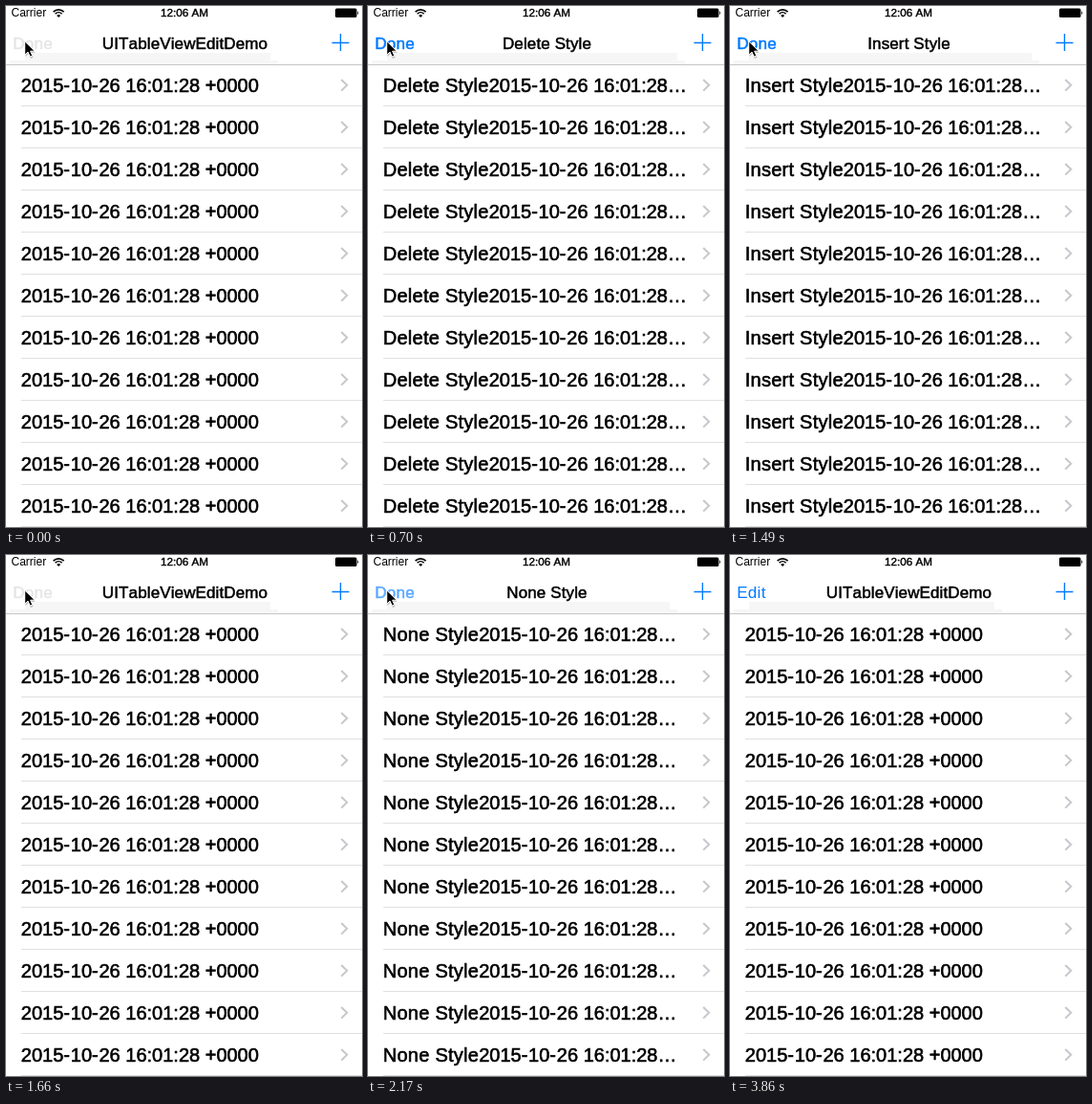
Write an HTML page that moves like this. It is 373 by 545 pixels and loops after 4.28 s.

```html
<!DOCTYPE html>
<html lang="en">
<head>
<meta charset="utf-8">
<title>Table view edit demo</title>
<style>
  html, body { margin: 0; width: 100%; height: 100%; overflow: hidden; background: #fff; }
  svg { display: block; width: 373px; height: 545px; }
  text { font-family: "Liberation Sans", Arial, Helvetica, sans-serif; fill: #000; font-kerning: none; }
  .medium { stroke: #000; stroke-width: .6px; }
  .row { font-size: 20px; }
  .prefix { letter-spacing: .25px; }
  .dash { letter-spacing: .8px; }
  .title { font-size: 17px; letter-spacing: .12px; text-anchor: middle; stroke-width: .5px; }
  .clock { font-size: 11.7px; text-anchor: middle; stroke-width: .4px; }
  #button { font-size: 17px; letter-spacing: .3px; stroke-width: .5px; }
  .rule { stroke: #e0e0e1; }
  .chevron { fill: none; stroke: #c7c7cc; stroke-width: 2; }
  .shade { fill: #f6f6f6; }
</style>
</head>
<body>
<svg viewBox="0 0 373 545">
  <rect width="373" height="545" fill="#fff"/>
  <text x="5.5" y="11" font-size="12">Carrier</text>
  <g fill="none" stroke="#000" stroke-width="1.6">
    <path d="M49.6 6.1a7.8 7.8 0 0 1 11 0M51.6 8.2a5 5 0 0 1 7 0"/>
    <path d="M55.1 12l-2-2.1a2.9 2.9 0 0 1 4 0z" fill="#000" stroke="none"/>
  </g>
  <text class="clock medium" x="187" y="11">12:06 AM</text>
  <rect x="345" y="2.5" width="22.5" height="9.5" rx="1.5"/>
  <path d="M368.4 5.2q2 2 0 4z"/>

  <rect id="shadeTop" class="shade" x="20" y="49" height="8"/>
  <rect id="shadeLow" class="shade" x="4" y="57" height="4"/>
  <path d="M0 61.5H373" stroke="#c6c6c8"/>
  <text id="title" class="title medium" x="187.5" y="45"></text>
  <text id="button" x="7.2" y="45"></text>
  <path d="M350.5 29v18M341.5 38.5h18" stroke="#007aff" stroke-width="1.4"/>
  <g id="rows"></g>
  <g id="cursor">
    <path d="M1 2v14.2l3.3-3.1 2.2 5 2.6-1.1-2.2-4.8h4.5z" opacity=".22" transform="translate(.4 .9)"/>
    <path d="M.7.9v14.3l3.3-3.1 2.2 5 2.5-1.1-2.1-4.8h4.5z" stroke="#fff" stroke-width="1"/>
  </g>
</svg>
<script>
const LOOP = 4280;
const BLUE = "#007aff", DIM = "#000";
const $ = id => document.getElementById(id);

// edge: right end of the bar tint, which follows the row text
const modes = {
  demo:   { title: "UITableViewEditDemo", prefix: "", tail: " +0000", edge: 277 },
  del:    { title: "Delete Style", prefix: "Delete Style", tail: "…", edge: 324 },
  insert: { title: "Insert Style", prefix: "Insert Style", tail: "…", edge: 316 },
  none:   { title: "None Style", prefix: "None Style", tail: "…", edge: 316 }
};

const modeTimes = [
  [0, "demo"], [440, "del"], [1050, "demo"], [1320, "insert"],
  [1660, "demo"], [1830, "none"], [2350, "demo"]
];

// time, label, colour, opacity
const buttonTimes = [
  [0, "Done", DIM, .1], [90, "Edit", BLUE, .24], [180, "Edit", BLUE, .6],
  [260, "Edit", BLUE, 1], [350, "Edit", DIM, .06],
  [530, "Done", BLUE, .25], [620, "Done", BLUE, .65], [700, "Done", BLUE, 1],
  [790, "Done", BLUE, .6], [880, "Done", BLUE, .2], [970, "Done", DIM, .1],
  [1140, "Edit", BLUE, .24], [1230, "Edit", DIM, .06],
  [1400, "Done", BLUE, .5], [1490, "Done", BLUE, 1], [1570, "Done", DIM, .1],
  [1740, "Edit", DIM, .06],
  [2000, "Done", BLUE, .25], [2090, "Done", BLUE, .65], [2180, "Done", BLUE, 1],
  [2260, "Done", DIM, .1], [2440, "Edit", BLUE, .24], [2530, "Edit", BLUE, .6],
  [2620, "Edit", BLUE, 1]
];

// time, x, y
const cursorTimes = [
  [0, 19, 36], [2620, 80, 140], [2710, 200, 345], [2800, 275, 452],
  [2980, 205, 250], [3070, 114, 39], [3330, 230, 330], [3420, 319, 542],
  [3690, 345, 533], [3780, 345, 538], [3860, 345, 580]
];

const at = (list, t) => list.findLast(item => item[0] <= t);

const date = "2015-10-26 16:01:28".replaceAll("-", '<tspan class="dash">-</tspan>');
$("rows").innerHTML = Array.from({ length: 11 }, (_, i) => {
  const y = 61 + 44 * i;
  return `<text class="row medium" x="15.8" y="${y + 29}"><tspan class="prefix"></tspan>` +
    `${date}<tspan class="tail"></tspan></text>` +
    `<path class="chevron" d="M351.3 ${y + 16}l6 5.8-6 5.8"/>` +
    `<path class="rule" d="M16 ${y + 43.5}H373"/>`;
}).join("");
const prefixes = document.querySelectorAll(".prefix");
const tails = document.querySelectorAll(".tail");
let shown;

function setMode(name) {
  if (name === shown) return;
  shown = name;
  const m = modes[name];
  $("title").textContent = m.title;
  prefixes.forEach(p => p.textContent = m.prefix);
  tails.forEach(p => p.textContent = m.tail);
  $("shadeTop").setAttribute("width", m.edge - 20);
  $("shadeLow").setAttribute("width", m.edge + 4);
}

function setButton(label, colour, opacity) {
  const button = $("button");
  if (button.textContent !== label) button.textContent = label;
  button.style.fill = colour;
  button.style.stroke = label === "Done" ? colour : "none";
  button.style.opacity = opacity;
}

function draw(t) {
  setMode(at(modeTimes, t)[1]);
  setButton(...at(buttonTimes, t).slice(1));
  const [, x, y] = at(cursorTimes, t);
  $("cursor").setAttribute("transform", `translate(${x} ${y})`);
}

const start = performance.now();
function tick() {
  draw((performance.now() - start) % LOOP);
  requestAnimationFrame(tick);
}
tick();
</script>
</body>
</html>
```
